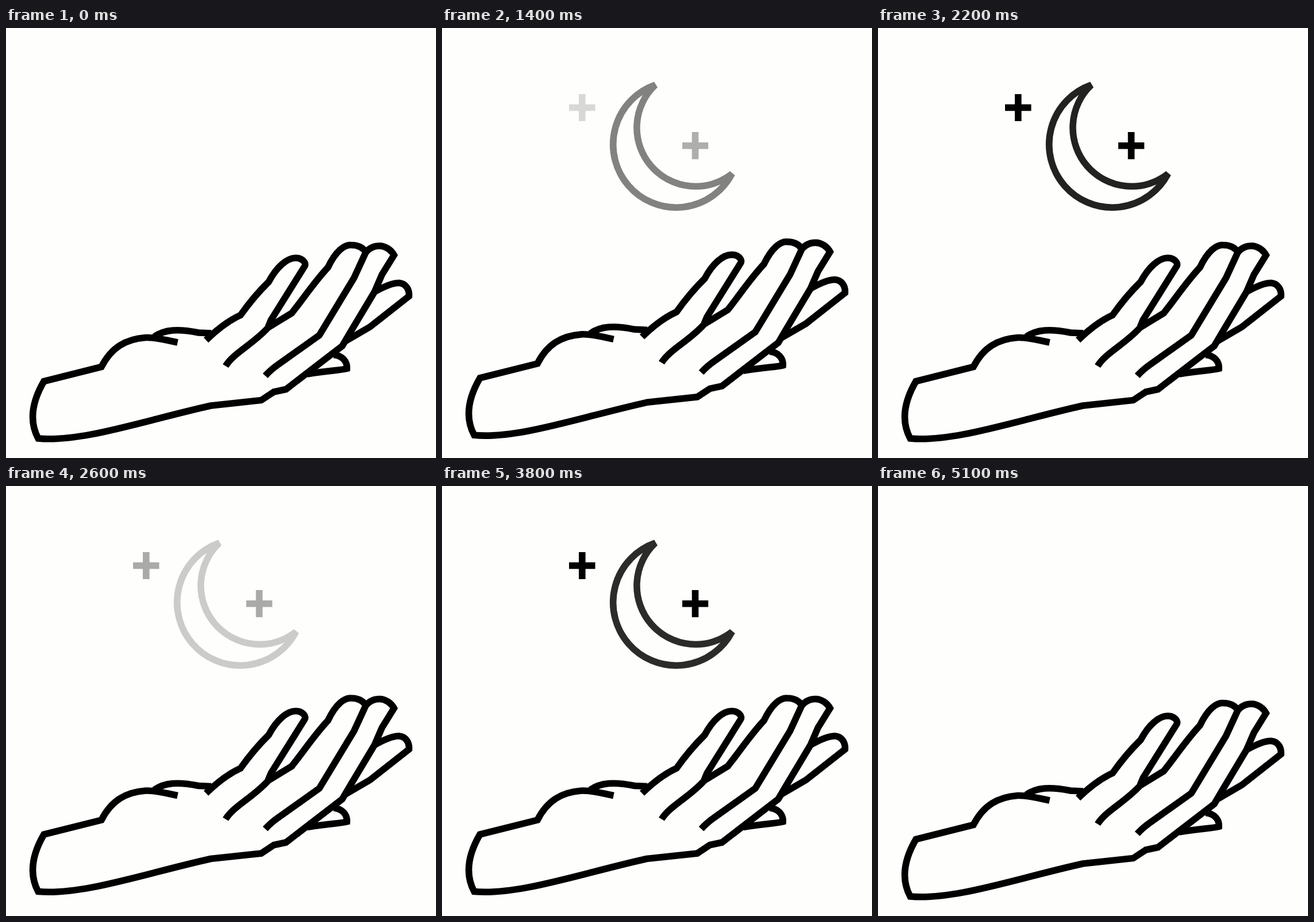
Write an HTML page that moves like this. It is 748 px wide and 748 px high and loops after 5200 ms.

```html
<!DOCTYPE html>
<html lang="en">
<head>
<meta charset="utf-8">
<title>Hand and moon</title>
<style>
  html, body { margin: 0; width: 100%; height: 100%; overflow: hidden; background: #fefefc; }
  svg { display: block; width: 100vw; height: 100vh; }
  path { fill: none; stroke: #000; stroke-width: 11.6; }
</style>
</head>
<body>
<svg viewBox="0 0 748 748">
  <path id="starLeft" opacity="0" d="M221 138.500h45.500M243.800 115v47"/>
  <path id="starRight" opacity="0" d="M418 204.800h45.200M440.500 181v47.300"/>
  <path id="moon" opacity="0" d="M371 99A109.700 109.700 0 1 0 504.500 253.500A102.190 102.190 0 0 1 371 99Z"/>
  <g id="hand">
    <!-- wrist, palm edge and index finger -->
    <path d="M298.500 547C275 542 259 538 243 538.500C208 541 183 556 166 589.500L66 614.500Q33 671 56 714C132 721 240 683 356 657L444 647.500L466 633L487 628.500L585 553L600 527.500L641 459L654 429L675 395C670 386 660 379 650 379C640 379 632 383 626 390"/>
    <!-- far side of the thumb -->
    <path d="M258 537C276 524 300 523 335 530L357 531"/>
    <!-- little finger -->
    <path d="M348 543Q380 512 408 499.500Q431 467 457 441.500C471 415 489 400 504 400C516 400 523 409 519.500 414.500L461 508L456 520"/>
    <!-- middle fingers -->
    <path d="M382 588C396 565 430 550 456 521L497 496C515 474 536 442 560 416.500C574 387 589 377 600 377.500C612 377.500 621 382 626 390L605.500 434.500L545 534.500L474 585Q461 594 451 605"/>
    <!-- back finger and thumb tip -->
    <path d="M641 459C659 449 674 443 684 443.500C695 444.500 702 454 701 466.500L633 520L590 545"/>
    <path d="M570 568.500C585 570 594 580 593 592.500C582 595.500 562 595.500 524 602"/>
  </g>
</svg>
<script>
  const LOOP = 5200, TICK = 100, FADE = 6, LIFT = 2.83;

  // Times are in ticks: the low points of the hand, and each fade as in, out, in, out.
  const lows = [-0.5, 11.5, 22.5, 31.5, 41.5, 51.5];
  const fades = {
    moon: [11.05, 21.2, 28.8, 37],
    starRight: [12.1, 22, 28.4, 38],
    starLeft: [13.1, 22, 27.4, 39]
  };

  const byId = id => document.getElementById(id);
  const clamp = v => Math.min(1, Math.max(0, v));

  function lift(tick) {
    const i = lows.findIndex(low => low > tick);
    return (Math.min(tick - lows[i - 1], lows[i] - tick) - 0.5) * LIFT;
  }

  const opacity = (tick, marks) => marks.reduce(
    (sum, mark, i) => sum + (i % 2 ? -1 : 1) * clamp((tick - mark) / FADE), 0);

  const start = performance.now();

  function draw() {
    const time = (performance.now() - start) % LOOP;
    const tick = Math.floor(time / TICK);
    byId('hand').setAttribute('transform', `translate(0 ${-lift(tick)})`);
    for (const id in fades) {
      byId(id).setAttribute('opacity', opacity(tick, fades[id]).toFixed(3));
    }
    requestAnimationFrame(draw);
  }
  draw();
</script>
</body>
</html>
```
